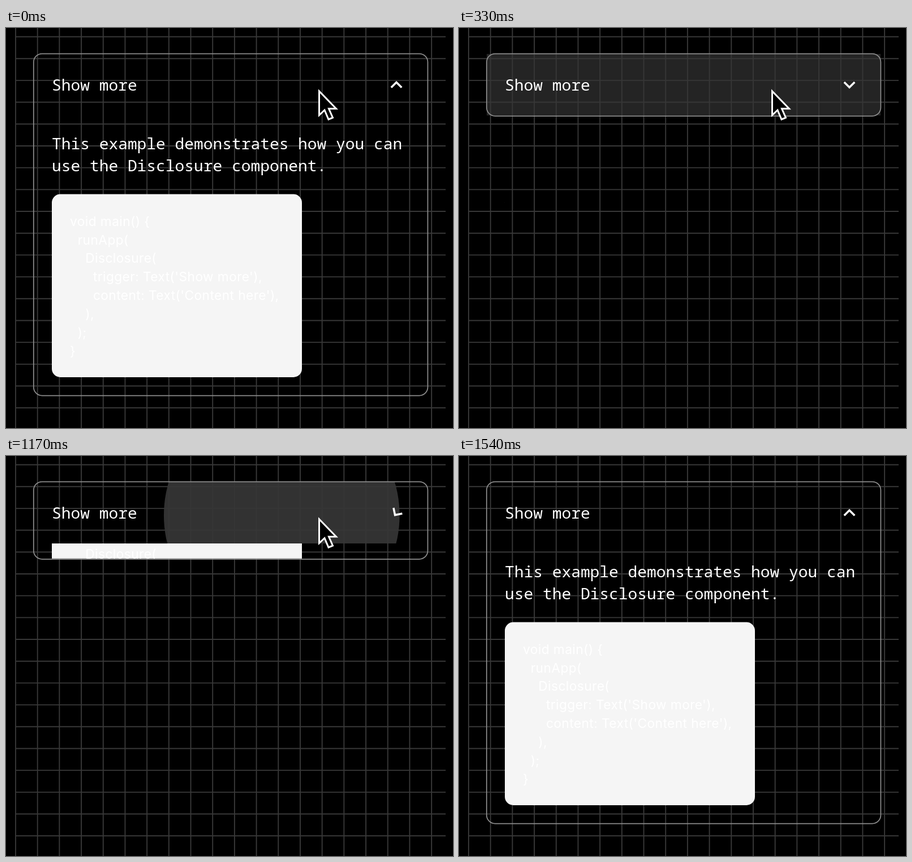
Write an HTML page that moves like this. It is 790x709 px and loops after 1960 ms.

```html
<!DOCTYPE html>
<html lang="en">
<head>
<meta charset="utf-8">
<title>Disclosure</title>
<style>
  /* --size: eased open amount, --turn: linear open amount, --spread: ripple growth */
  @property --size { syntax: "<number>"; inherits: true; initial-value: 1; }
  @property --turn { syntax: "<number>"; inherits: true; initial-value: 1; }
  @property --spread { syntax: "<number>"; inherits: true; initial-value: 0; }

  html, body { margin: 0; width: 100%; height: 100%; overflow: hidden; background: #000; }

  svg {
    display: block;
    animation: size 1960ms linear infinite, turn 1960ms linear infinite, spread 1960ms linear infinite;
  }
  text { white-space: pre; fill: #fff; }
  .mono { font: 400 27.9px "Roboto Mono", "Noto Sans Mono", monospace; }
  .title { font-weight: 500; }
  .code { font: 400 22.7px Inter, sans-serif; letter-spacing: .436px; }

  #frame { height: calc(110.4px + 495.6px * var(--size)); }
  #window { height: calc(495.6px * var(--size)); }
  #content { transform: translateY(calc(-247.8px * (1 - var(--size)))); }
  #chevron { transform: translate(690px, 100.8px) rotate(calc(180deg * var(--turn))) scale(1.745); }
  #ripple {
    cx: calc(549px - 152px * var(--spread));
    cy: calc(108px - 7px * var(--spread));
    r: calc(106px + 252px * var(--spread));
    fill: #363636;
    animation: fade 1960ms linear infinite;
  }
  #cursor { animation: leave 1960ms linear infinite; }

  @keyframes size {
    0% { --size: 1; }
    3.214% { --size: 1; animation-timing-function: cubic-bezier(0, 0, .58, 1); }
    13.418% { --size: 0; }
    57.857% { --size: 0; animation-timing-function: cubic-bezier(.42, 0, 1, 1); }
    68.061%, 100% { --size: 1; }
  }
  @keyframes turn {
    0%, 3.214% { --turn: 1; }
    13.418%, 57.857% { --turn: 0; }
    68.061%, 100% { --turn: 1; }
  }
  @keyframes spread {
    0% { --spread: 0; }
    2.602% { --spread: 0; animation-timing-function: ease; }
    14.082%, 40% { --spread: 1; }
    40.01% { --spread: 0; }
    56.888% { --spread: 0; animation-timing-function: ease; }
    68.367%, 100% { --spread: 1; }
  }
  @keyframes fade {
    0%, 2.035% { opacity: 0; }
    2.04% { opacity: .3; }
    4.694%, 14.745% { opacity: .94; }
    22.398%, 55.09% { opacity: 0; }
    55.1% { opacity: .3; }
    57.755%, 68.622% { opacity: .94; }
    76.276%, 100% { opacity: 0; }
  }
  @keyframes leave {
    0% { transform: none; }
    71.429% { transform: none; animation-timing-function: ease-in; }
    76.531%, 78.56% { transform: translateY(-73px); visibility: visible; }
    78.57%, 100% { transform: translateY(-73px); visibility: hidden; }
  }
</style>
</head>
<body>
<svg width="790" height="709" viewBox="0 0 790 709">
  <defs>
    <clipPath id="header"><rect x="49" y="46" width="696" height="109"/></clipPath>
    <clipPath id="body"><rect id="window" x="49" y="155" width="696"/></clipPath>
  </defs>

  <path id="grid" fill="none" stroke="#383838" stroke-width="1.9"/>
  <g clip-path="url(#header)"><circle id="ripple"/></g>

  <g clip-path="url(#body)">
    <g id="content">
      <text class="mono" x="81" y="215.3">This example demonstrates how you can</text>
      <text class="mono" x="81" y="254.3">use the Disclosure component.</text>
      <rect x="81" y="294.5" width="442" height="324.5" rx="15" fill="#f5f5f5"/>
      <g id="listing"></g>
    </g>
  </g>

  <rect id="frame" x="48.8" y="45.6" width="696.6" rx="15" fill="none" stroke="#8c8c8c" stroke-width="1.75"/>
  <text class="mono title" x="81" y="110.8">Show more</text>
  <path id="chevron" fill="#fff" d="M4.59-3.41 0 1.17-4.59-3.41-6-2 0 4 6-2z"/>
  <path id="cursor" fill="#000" stroke="#fff" stroke-width="3"
    d="M553.5 112V154.5L563 145.5 570 162 577.5 159 570.5 143H583.5Z"/>
</svg>
<script>
  const step = 38.69;
  let lines = "";
  for (let i = 0; i < 20; i++) lines += `M${17 + i * step} 0V709`;
  for (let i = 0; i < 18; i++) lines += `M17 ${15.5 + i * step}H777`;
  document.getElementById("grid").setAttribute("d", lines);

  const code = `void main() {
  runApp(
    Disclosure(
      trigger: Text('Show more'),
      content: Text('Content here'),
    ),
  );
}`;
  const listing = document.getElementById("listing");
  code.split("\n").forEach((line, i) => {
    const row = document.createElementNS(listing.namespaceURI, "text");
    row.setAttribute("class", "code");
    row.setAttribute("x", 113);
    row.setAttribute("y", 350.6 + i * 32.93);
    row.textContent = line;
    listing.append(row);
  });
</script>
</body>
</html>
```
